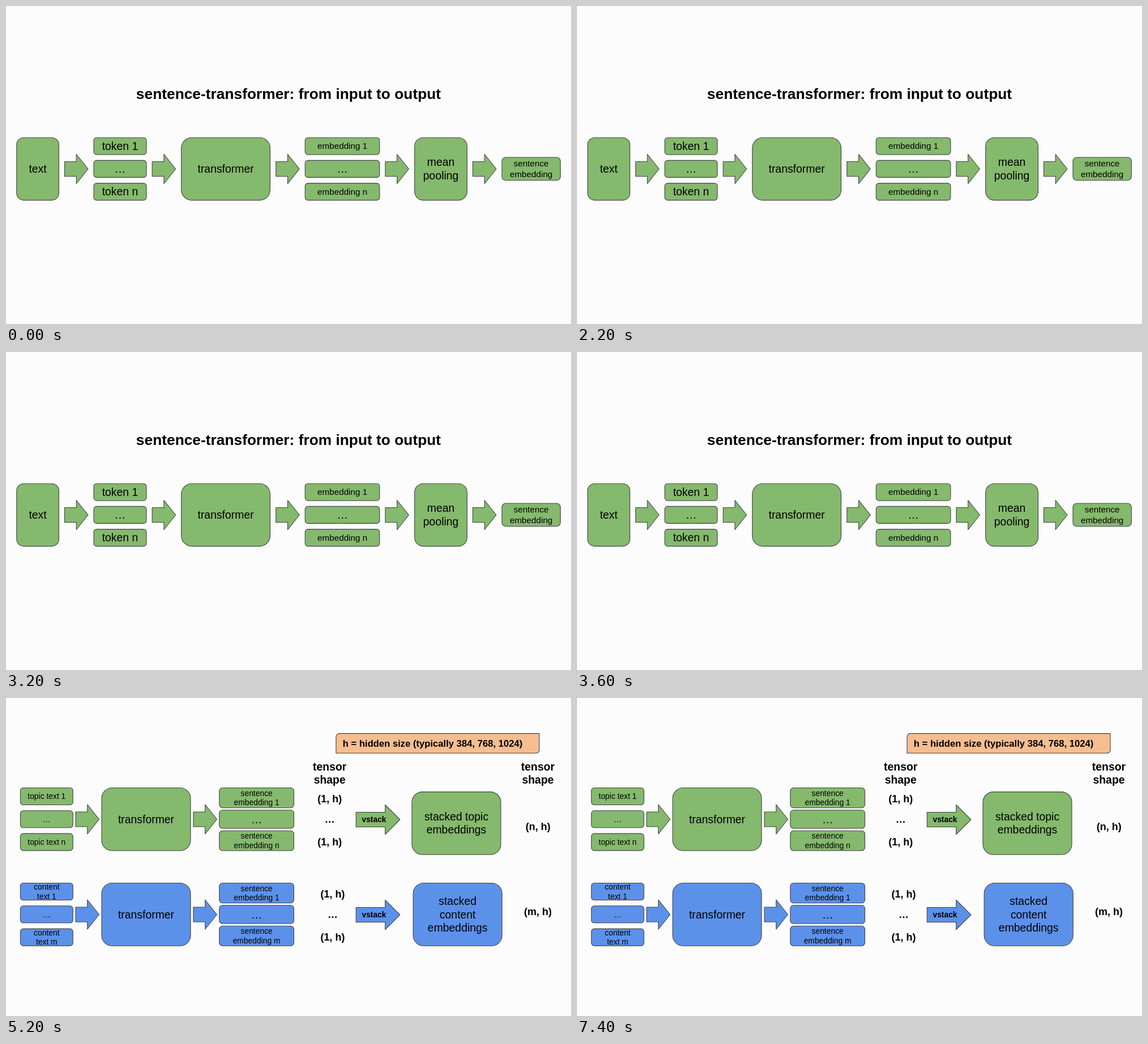
An HTML page that plays this animation: 998 px wide and 561 px high, repeating every 8000 ms.

```html
<!DOCTYPE html>
<html lang="en">
<head>
<meta charset="utf-8">
<title>Sentence embeddings</title>
<style>
html, body { margin: 0; width: 100%; height: 100%; overflow: hidden; background: #fcfcfd; }
svg { display: block; width: 998px; height: 561px; }
text { font-family: "Liberation Sans", Arial, sans-serif; text-anchor: middle; }
.shape { stroke: #434343; stroke-width: 1.1; stroke-linejoin: round; }
</style>
</head>
<body>
<svg viewBox="0 0 998 561">
  <g id="pipeline"></g>
  <g id="stacking" visibility="hidden"></g>
</svg>
<script>
const GREEN = '#85b96d', BLUE = '#5c91ea', ORANGE = '#f6be90';
const PT = 998 / 720; // slide points to pixels
const LOOP = 8000, CUT = 5200;
const pipeline = document.getElementById('pipeline');
const stacking = document.getElementById('stacking');
let layer = pipeline;

function add(tag, attrs, content = '') {
  const el = document.createElementNS('http://www.w3.org/2000/svg', tag);
  for (const key in attrs) el.setAttribute(key, attrs[key]);
  el.textContent = content;
  layer.append(el);
}

// Lines of text centred on (x, y); size in points
function label(str, x, y, size, weight = 'normal') {
  const px = size * PT, lines = str.split('\n');
  lines.forEach((line, i) => add('text', {
    x, y: y + px * (0.3465 + 1.21 * (i - (lines.length - 1) / 2)),
    'font-size': px, 'font-weight': weight
  }, line));
}

const bold = (str, x, y, size) => label(str, x, y, size, 'bold');

function box(str, x, y, width, height, size, fill) {
  add('rect', { x, y, width, height, rx: Math.min(width, height) / 6, fill, class: 'shape' });
  label(str, x + width / 2, y + height / 2, size);
}

function arrow(x, cy, width, fill) {
  const h = 26, neck = width - Math.min(width, 2 * h) / 2;
  add('path', {
    d: `M${x} ${cy - h / 2}h${neck}v${-h / 2}L${x + width} ${cy}L${x + neck} ${cy + h}v${-h / 2}h${-neck}z`,
    fill, class: 'shape'
  });
}

function drawPipeline() {
  bold('sentence-transformer: from input to output', 499, 154.5, 19);
  box('text', 18.8, 232.2, 74.6, 110.4, 14, GREEN);
  ['1', '…', 'n'].forEach((id, i) => {
    const y = 232.2 + 40.2 * i, dots = id === '…';
    box(dots ? id : 'token ' + id, 155, y, 93, 30, 14, GREEN);
    box(dots ? id : 'embedding ' + id, 528.3, y, 131.6, 30, dots ? 14 : 11, GREEN);
  });
  box('transformer', 309.7, 232.2, 156.8, 110.4, 14, GREEN);
  box('mean\npooling', 721.7, 232.2, 92.8, 110.4, 14, GREEN);
  box('sentence\nembedding', 876, 267, 103.3, 40.5, 11, GREEN);
  [103.5, 258.2, 476.8, 670, 824.5].forEach(x => arrow(x, 287.5, 41.5, GREEN));
}

function drawRow(top, fill, inputs, last, shapeX) {
  const mid = top + 55.5;
  inputs.forEach((str, i) => box(str, 25.4, top + 40.3 * i, 92.8, 30, 10, fill));
  arrow(123, mid, 41.5, fill);
  box('transformer', 169, top, 157, 110.7, 14, fill);
  arrow(331, mid, 41.5, fill);
  box('sentence\nembedding 1', 376.8, top, 131.7, 35.3, 10, fill);
  box('…', 376.8, top + 39.3, 131.7, 32.2, 14, fill);
  box('sentence\nembedding ' + last, 376.8, top + 75.7, 131.7, 35, 10, fill);
  bold('(1, h)', shapeX, top + 19, 13);
  bold('…', shapeX, top + 55.5, 13);
  bold('(1, h)', shapeX, top + 95, 13);
  arrow(618.3, mid + 0.5, 77.5, fill);
  bold('vstack', 650, mid + 0.5, 10);
}

function drawStacking() {
  add('path', { d: 'M588.8 62.6H942v28.8a5.8 5.8 0 0 1-5.8 5.8H583V68.4a5.8 5.8 0 0 1 5.8-5.8z', fill: ORANGE, class: 'shape' });
  bold('h = hidden size (typically 384, 768, 1024)', 753.5, 80, 12);
  bold('tensor\nshape', 571.7, 133, 14);
  bold('tensor\nshape', 939.5, 133, 14);
  drawRow(158.5, GREEN, ['topic text 1', '…', 'topic text n'], 'n', 571.7);
  drawRow(326.5, BLUE, ['content\ntext 1', '…', 'content\ntext m'], 'm', 577);
  box('stacked topic\nembeddings', 717, 165.6, 157, 110.7, 14, GREEN);
  box('stacked\ncontent\nembeddings', 719.2, 326.5, 157, 110.7, 14, BLUE);
  bold('(n, h)', 939.7, 227, 13);
  bold('(m, h)', 939.5, 377, 13);
}

function tick() {
  const first = performance.now() % LOOP < CUT;
  pipeline.setAttribute('visibility', first ? 'visible' : 'hidden');
  stacking.setAttribute('visibility', first ? 'hidden' : 'visible');
  requestAnimationFrame(tick);
}

drawPipeline();
layer = stacking;
drawStacking();
tick();
</script>
</body>
</html>
```
